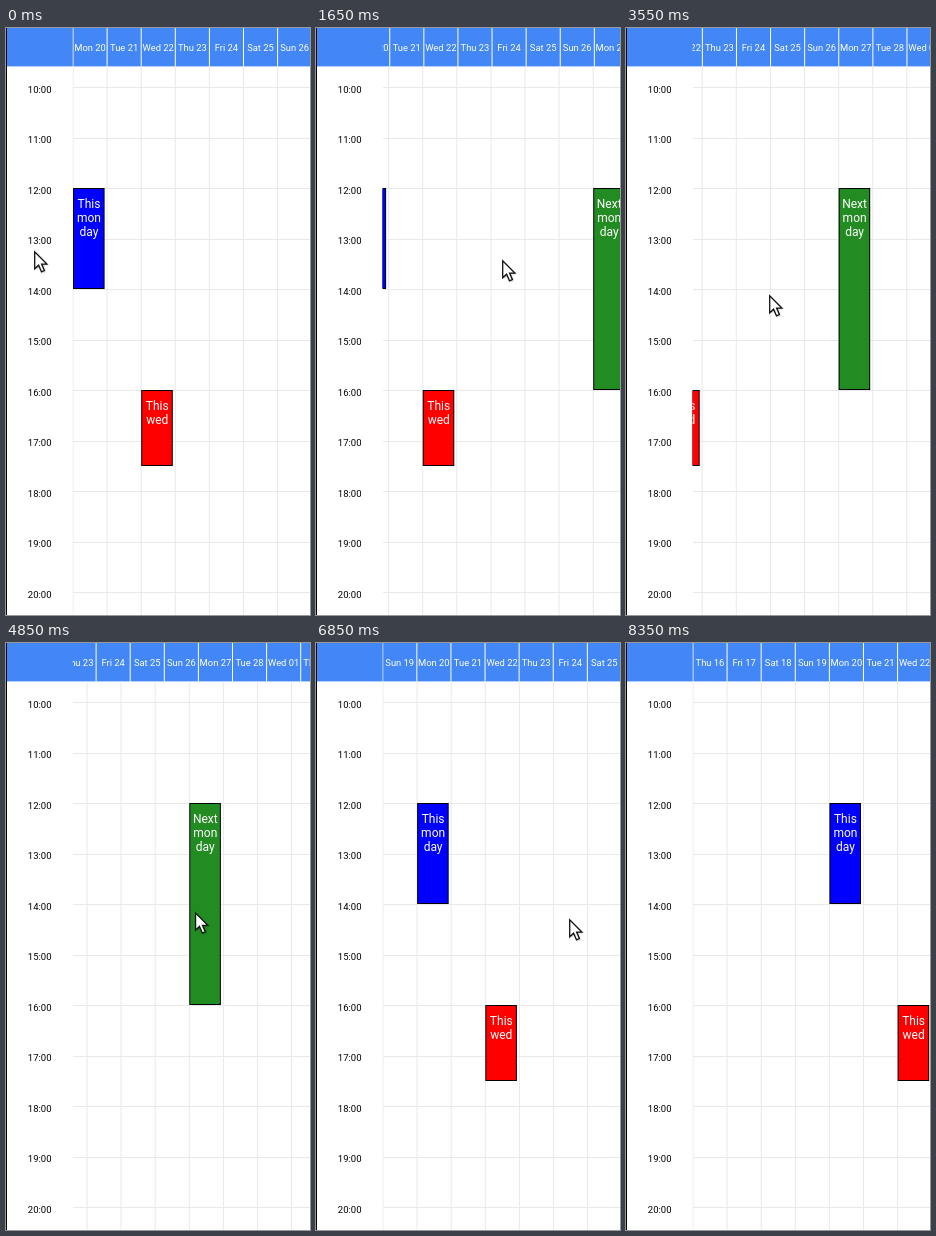
Animation of 304 by 587 pixels, one loop 8750 ms. Source, as an HTML page with a canvas:

```html
<!DOCTYPE html>
<html lang="en">
<head>
<meta charset="utf-8">
<title>Week calendar</title>
<style>
  html, body { margin: 0; width: 100%; height: 100%; overflow: hidden; background: #fff; }
  canvas { display: block; width: 304px; height: 587px; }
</style>
</head>
<body>
<canvas id="stage"></canvas>
<script>
const W = 304, H = 587, LOOP = 8750, STEP = 50;
const LEFT = 67, COL = 34.1, HEAD = 38.4, TOP = 59.3, HOUR = 50.5;
const canvas = document.getElementById('stage');
const ctx = canvas.getContext('2d');
const dpr = window.devicePixelRatio || 1;
canvas.width = W * dpr;
canvas.height = H * dpr;

// A drag carries the grid along; a free move lets it settle on a whole column.
const moves = [];
let pose = { x: 28, y: 223, scroll: 0 };
function move(start, end, x, y, dragging) {
  const scroll = dragging ? pose.scroll + pose.x - x : Math.round(pose.scroll / COL) * COL;
  const to = { x, y, scroll };
  moves.push({ start, end, from: pose, to });
  pose = to;
}
const free = (start, end, x, y) => move(start, end, x, y, false);
const drag = (start, end, x, y) => move(start, end, x, y, true);

free(600, 1100, 214.5, 235);
drag(1400, 1650, 186, 232);
free(1700, 2600, 202, 262);
drag(2600, 3550, 143, 267);
free(3900, 4500, 209, 268);
drag(4500, 4750, 198, 269);
drag(4800, 5300, 150, 270);
free(5300, 5950, 204, 263);
free(5950, 6200, 75, 270);
drag(6200, 6550, 270, 275);
free(6550, 6850, 253, 276);
free(6850, 7100, 165, 278);
drag(7100, 7450, 258, 276);
free(7500, 8350, 20, 600);

const easeOut = u => 1 - (1 - u) * (1 - u);

function poseAt(t) {
  const m = moves.filter(m => m.start <= t).pop();
  if (!m) return moves[0].from;
  const e = easeOut(Math.min(1, (t - m.start) / (m.end - m.start)));
  const mix = key => m.from[key] + (m.to[key] - m.from[key]) * e;
  return { x: mix('x'), y: mix('y'), scroll: mix('scroll') };
}

const events = [
  { day: 0, from: 12, to: 14, color: '#0000ff', words: ['This', 'mon', 'day'] },
  { day: 2, from: 16, to: 17.5, color: '#ff0000', words: ['This', 'wed'] },
  { day: 7, from: 12, to: 16, color: '#228b22', words: ['Next', 'mon', 'day'] }
];
const names = ['Sun', 'Mon', 'Tue', 'Wed', 'Thu', 'Fri', 'Sat'];

function rect(x, y, w, h, color) {
  ctx.fillStyle = color;
  ctx.fillRect(x, y, w, h);
}

function text(str, x, y, size, color) {
  ctx.font = size + 'px Roboto, sans-serif';
  ctx.fillStyle = color;
  ctx.fillText(str, x, y);
}

function dayLabel(k) {
  const d = new Date(2023, 1, 20 + k);
  return names[d.getDay()] + ' ' + String(d.getDate()).padStart(2, '0');
}

const hourY = h => TOP + (h - 10) * HOUR;

function eachDay(scroll, paint) {
  const first = Math.floor(scroll / COL);
  for (let k = first; k < first + 9; k++) paint(LEFT + k * COL - scroll, k);
}

function drawEvent(e, scroll) {
  const x = LEFT + e.day * COL - scroll;
  const y = Math.round(hourY(e.from)), h = Math.round(hourY(e.to)) - y;
  rect(x, y, 31.6, h, '#000');
  rect(x + 1, y + 1, 29.6, h - 2, e.color);
  e.words.forEach((w, i) => text(w, x + 16, y + 20.2 + i * 13.7, 12, '#fff'));
}

function drawPointer(x, y) {
  ctx.save();
  ctx.translate(x + 0.7, y + 0.8);
  ctx.beginPath();
  [[0, 0], [0, 17], [3.9, 13.4], [6.8, 20], [9.7, 18.7], [6.9, 12.3], [12.2, 12.3]]
    .forEach(p => ctx.lineTo(...p));
  ctx.closePath();
  ctx.shadowColor = 'rgba(0,0,0,.35)';
  ctx.shadowBlur = 2 * dpr;
  ctx.shadowOffsetX = ctx.shadowOffsetY = dpr;
  ctx.fillStyle = '#fff';
  ctx.fill();
  ctx.shadowColor = 'transparent';
  ctx.strokeStyle = '#111';
  ctx.lineWidth = 1.3;
  ctx.stroke();
  ctx.restore();
}

function draw(t) {
  const { x, y, scroll } = poseAt(t);
  const headScroll = poseAt(t - STEP).scroll; // the header trails the grid by one step
  ctx.setTransform(dpr, 0, 0, dpr, 0, 0);
  ctx.textAlign = 'center';
  rect(0, 0, W, H, '#fff');
  rect(0, 0, W, HEAD, '#4287f5');
  for (let h = 10; h <= 20; h++) {
    rect(LEFT, Math.round(hourY(h)), W - LEFT, 1, '#e9e9e9');
    text(h + ':00', 33.7, hourY(h) + 5.2, 9.5, '#000');
  }

  ctx.save();
  ctx.beginPath();
  ctx.rect(66.5, 0, W, H);
  ctx.clip();
  eachDay(scroll, left => rect(left - 0.5, HEAD, 1, H, '#e9e9e9'));
  eachDay(headScroll, (left, k) => {
    rect(left - 0.5, 0, 1, HEAD, '#fff');
    text(dayLabel(k), left + 17, 23.2, 9.4, '#fff');
  });
  events.forEach(e => drawEvent(e, scroll));
  ctx.restore();

  rect(0, 0, 1, H, '#000');
  drawPointer(x, y);
}

const start = performance.now();
function tick() {
  const t = (performance.now() - start) % LOOP;
  draw(Math.floor(t / STEP) * STEP);
  requestAnimationFrame(tick);
}
tick();
</script>
</body>
</html>
```
